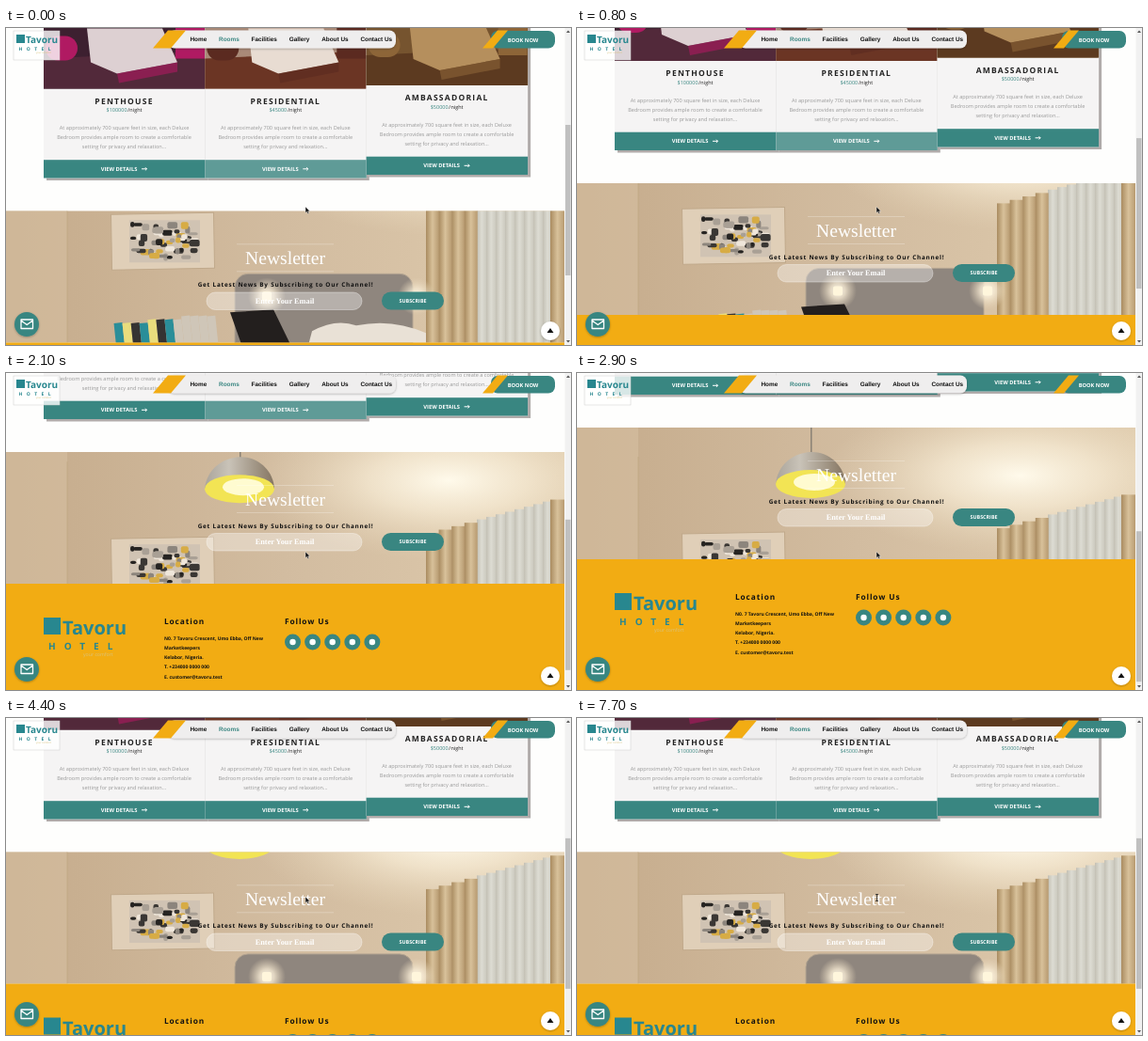
Animation, 600 px wide and 337 px high, one loop 8 s. Source, as an HTML page:

```html
<!DOCTYPE html>
<html lang="en">
<head>
<meta charset="utf-8">
<title>Hotel page scroll</title>
<style>
  html, body { margin: 0; width: 100%; height: 100%; overflow: hidden; background: #fefefd; }
  svg { display: block; }
  text { font-family: "Open Sans", sans-serif; text-rendering: geometricPrecision; white-space: pre; }
  .b { font-weight: 700; }
  .mid { text-anchor: middle; }
  .serif { font-family: "Liberation Serif", serif; }
  .nav { font-family: "Liberation Sans", sans-serif; font-weight: 700; }
</style>
</head>
<body>
<svg id="stage" width="600" height="337" viewBox="0 0 600 337">
  <defs>
    <linearGradient id="wall"><stop stop-color="#c5ab8b"/><stop offset=".5" stop-color="#d2bca0"/><stop offset="1" stop-color="#dfcbad"/></linearGradient>
    <radialGradient id="glow"><stop stop-color="#fffaeb"/><stop offset=".4" stop-color="#f5e9d2" stop-opacity=".8"/><stop offset="1" stop-color="#e6d5b8" stop-opacity="0"/></radialGradient>
    <linearGradient id="shade"><stop stop-color="#aaa49a"/><stop offset=".35" stop-color="#c9c3b8"/><stop offset="1" stop-color="#857561"/></linearGradient>
    <linearGradient id="drape"><stop stop-color="#a98b60"/><stop offset=".5" stop-color="#d8c19a"/><stop offset="1" stop-color="#b79a70"/></linearGradient>
    <linearGradient id="sheer"><stop stop-color="#c3c0b4"/><stop offset=".5" stop-color="#dddcd3"/><stop offset="1" stop-color="#cbc9be"/></linearGradient>
    <filter id="soft" x="-30%" y="-30%" width="160%" height="160%"><feDropShadow dx="0" dy=".8" stdDeviation=".8" flood-opacity=".3"/></filter>
  </defs>
  <g id="page"></g>
  <g id="fixed"></g>
</svg>
<script>
const TEAL = '#398681', GOLD = '#f2ac13';
const $ = id => document.getElementById(id);
const text = (s, x, y, size, cls = '', fill = '#111', gap = 0) =>
  `<text x="${x}" y="${y}" dy=".36em" font-size="${size}" class="${cls}" fill="${fill}" letter-spacing="${gap}">${s}</text>`;
const rect = (x, y, w, h, fill, more = '') =>
  `<rect x="${x}" y="${y}" width="${w}" height="${h}" fill="${fill}" ${more}/>`;
const pill = (x, y, w, h, fill, more = '') => rect(x, y, w, h, fill, `rx="${h / 2}" ${more}`);
const disc = (x, y, r, fill, more = '') => `<circle cx="${x}" cy="${y}" r="${r}" fill="${fill}" ${more}/>`;
const path = (d, fill, more = '') => `<path d="${d}" fill="${fill}" ${more}/>`;
const repeat = (n, fn) => Array.from({ length: n }, (_, i) => fn(i)).join('');

let seed = 11;
const random = () => (seed = seed * 16807 % 2147483647) / 2147483647;

// Page parts are placed relative to the top of the newsletter section.
const rooms = [
  { name: 'PENTHOUSE', price: '$100000', wall: '#3d2030', floor: '#52293a', bed: '#ddd0d2', accent: '#b01a62' },
  { name: 'PRESIDENTIAL', price: '$45000', wall: '#a98a78', floor: '#6b3524', bed: '#e8dcd2', accent: '#5b2a20' },
  { name: 'AMBASSADORIAL', price: '$50000', wall: '#76542f', floor: '#5c3a20', bed: '#b58f5d', accent: '#8d6538' }
];

const photo = ({ wall, floor, bed, accent }) =>
  rect(0, -245, 171.5, 115, wall) + path('M0-130V-162L171-170V-130Z', floor) +
  pill(2, -186, 34, 26, accent) + rect(140, -200, 31, 38, accent) +
  path('M46-194H126L142-158L78-146L50-158Z', bed) + path('M78-146L142-158V-148L80-136Z', accent, 'opacity=".6"');

function card(room, i) {
  const x = 85.5, copy = [
    'At approximately 700 square feet in size, each Deluxe',
    'Bedroom provides ample room to create a comfortable',
    'setting for privacy and relaxation...'
  ];
  return `<g transform="translate(${40 + 171.3 * i} ${i == 2 ? -3.5 : 0})">` +
    rect(3, -200, 171.5, 167.5, '#b0abaa') + rect(0, -200, 171.5, 165, '#f5f4f4') + photo(room) +
    text(room.name, x, -116.7, 8.5, 'b mid', '#222', 1.25) +
    text(`<tspan fill="${TEAL}">${room.price}</tspan><tspan dx=".8">/night</tspan>`, x, -107.3, 5.5, 'mid', '#222') +
    copy.map((line, n) => text(line, x, -88.5 + 10.2 * n, 5.55, 'mid', '#999')).join('') +
    rect(0, -54.3, 171.5, 19.3, TEAL, i == 1 ? 'id="hovered"' : '') +
    text('VIEW DETAILS', x - 5.5, -44.7, 5.75, 'b mid', '#fff') +
    path('M104-44.7h5.5m-1.6-1.6l1.6 1.6-1.6 1.6', 'none', 'stroke="#fff"') + '</g>';
}

function picture() {
  const inks = ['#262422', '#8c857d', '#efe6da', '#a9a095', '#3a3734', '#d7ac45'];
  return rect(112, 181, 109, 59, '#e0cfb8', 'stroke="#c0a98b" transform="rotate(-1 166 210)"') +
    rect(131, 188, 75, 45, '#d0c3b3') +
    repeat(60, i => rect(132 + random() * 64, 189 + random() * 37, 4 + random() * 7, 3 + random() * 5, inks[i % 6], 'rx="2"'));
}

const lamp = () => rect(248, 40, 1.5, 58, '#8a8175') +
  path('M211 129C213 108 230 96 248 95S284 108 285 129Z', 'url(#shade)') +
  '<ellipse cx="248" cy="129" rx="37" ry="15" fill="#f2e454"/><ellipse cx="252" cy="127" rx="22" ry="9" fill="#fffbd0"/>';

// Hanging folds whose tops follow the rising curtain rail.
const folds = (x, n, width, fill) =>
  repeat(n, i => rect(x + i * width, 176 - .27 * (x + i * width - 446), width + .3, 260, `url(#${fill})`));

function room() {
  const sconce = x => disc(x, 269, 20, 'url(#glow)') + rect(x - 5, 264, 10, 10, '#fff6dc', 'rx="2"');
  return rect(0, 0, 593, 400, 'url(#wall)') + rect(0, 0, 65, 400, '#d9c4a5', 'opacity=".5"') +
    rect(64.5, 100, 1, 300, '#b99f7a', 'opacity=".5"') +
    '<ellipse cx="470" cy="120" rx="210" ry="85" fill="url(#glow)"/>' +
    folds(500, 8, 10, 'sheer') + folds(446, 4, 13.6, 'drape') + folds(578, 1, 15, 'drape') +
    picture() + lamp() +
    rect(243, 245, 189, 150, '#8f867e', 'rx="14" stroke="#b3a491"') + sconce(277) + sconce(436) +
    path('M325 306Q350 292 372 300Q410 292 446 308V400H300Z', '#e9e1d6') +
    path('M238 286L284 283L302 320H250Z', '#231f1e') +
    repeat(12, i => rect(116 + i * 9, 294 + i % 4, 9, 40, ['#2a8e99', '#e9dd7d', '#353332', '#cfc6b8'][i < 7 ? i % 3 : 3], 'transform="rotate(-6 150 310)"'));
}

const newsletter = () =>
  `<svg width="593" height="140" overflow="hidden"><g id="room">${room()}</g></svg>` +
  [35, 64].map(y => rect(245, y, 103, .7, '#fff', 'opacity=".35"')).join('') +
  text('Newsletter', 296.5, 49.6, 19.6, 'serif mid', '#fff') +
  text('Get Latest News By Subscribing to Our Channel!', 297, 78.5, 6.4, 'b mid', '#111', .75) +
  pill(213, 86.5, 165, 18.5, '#fff', 'fill-opacity=".35" stroke="#fff" stroke-opacity=".5" stroke-width=".7"') +
  text('Enter Your Email', 296, 95.5, 8.3, 'serif b mid', '#fff') +
  pill(399, 86, 66, 19, TEAL) + text('SUBSCRIBE', 432, 95.5, 5.4, 'b mid', '#fff');

// The hotel sign is about 88 wide at scale 1.
const sign = (x, y, scale) => `<g transform="translate(${x} ${y}) scale(${scale})">` +
  rect(0, 2, 18, 18, '#28878f') + text('Tavoru', 20, 13, 20, 'b', '#28878f') +
  text('HOTEL', 5, 32, 10, 'b', '#28878f', 9) + text('your comfort', 42, 41, 5.2, '', '#d9c27a') + '</g>';

function footer() {
  const address = ['N0. 7 Tavoru Crescent, Umo Ebba, Off New', 'Marketkeepers', 'Kelabor, Nigeria.', 'T. +234000 0000 000', 'E. customer@tavoru.test'];
  return rect(0, 140, 593, 260, GOLD) + sign(40, 174, 1) +
    text('Location', 168, 180, 8.3, 'b', '#111', .9) + text('Follow Us', 296, 180, 8.3, 'b', '#111', .9) +
    address.map((line, i) => text(line, 168, 198 + i * 10.2, 5, 'b')).join('') +
    repeat(5, i => disc(304.5 + 21.1 * i, 202, 8.5, TEAL) + disc(304.5 + 21.1 * i, 202, 3.2, '#fff'));
}

function overlay() {
  const links = ['Home', 'Rooms', 'Facilities', 'Gallery', 'About Us', 'Contact Us']
    .map((s, i) => `<tspan dx="${i ? 12.8 : 0}" fill="${i == 1 ? TEAL : '#111'}">${s}</tspan>`).join('');
  const slash = (x, w) => path(`M${x} 21.5l16-19h${w}l-16 19z`, GOLD);
  return rect(8, 3, 49, 31, '#fff', 'fill-opacity=".8" stroke="#ccc" stroke-width=".5"') + sign(11, 6, .5) +
    rect(172, 2.5, 242, 19, '#efeeee', 'rx="7" filter="url(#soft)"') + slash(156, 19) +
    text(links, 195.5, 12, 6.4, 'nav') +
    rect(515, 3, 68, 18.5, TEAL, 'rx="7"') + slash(506, 11) + text('BOOK NOW', 549, 12.5, 5.7, 'b mid', '#fff') +
    disc(22, 315, 13, TEAL, 'filter="url(#soft)"') +
    path('M16 310h12.5v9.5H16zM16 311l6.2 4.5 6.2-4.5', 'none', 'stroke="#fff" stroke-width="1.3" stroke-linejoin="round"') +
    disc(578, 322, 10, '#fff', 'filter="url(#soft)"') + path('M574.5 324l3.5-5 3.5 5z', '#111') +
    rect(593.5, 0, 6.5, 337, '#f1f1f1') + rect(594, 0, 5.5, 160, '#c0c0c0', 'id="thumb"') +
    path('M595 5l2-2.5 2 2.5zM595 332l2 2.5 2-2.5z', '#555') +
    path('M318 190v6.5l1.5-1.3 1 2.3 1.2-.5-1-2.2h2z', '#111', 'id="arrow" stroke="#fff" stroke-width=".4"') +
    path('M317 187.5h3m-1.5 0v7m-1.5 0h3', 'none', 'id="beam" stroke="#222" stroke-width=".8"');
}

$('page').innerHTML = rooms.map(card).join('') + newsletter() + footer();
$('fixed').innerHTML = overlay();

// Key points of the scroll: time in ms, top of the newsletter section.
const scroll = [[0, 194.5], [800, 165], [2100, 84], [2900, 58], [3900, 113], [4400, 142.5], [8000, 142.5]];

function sectionTop(t) {
  const i = scroll.findIndex(([time]) => time > t);
  const [[t0, y0], [t1, y1]] = [scroll[i - 1], scroll[i]];
  return y0 + (y1 - y0) * (t - t0) / (t1 - t0);
}

function draw() {
  const t = Math.floor(performance.now() % 8000 / 100) * 100;
  const top = sectionTop(t);
  $('page').setAttribute('transform', `translate(0 ${top})`);
  // The photo behind the newsletter scrolls at a fifth of the page speed.
  $('room').setAttribute('transform', `translate(0 ${.2 * (top - 113) - top})`);
  $('thumb').setAttribute('y', 103 + (194.5 - top) * .478);
  $('hovered').setAttribute('fill', t < 2300 ? '#5f9b97' : TEAL);
  $(t < 7200 ? 'arrow' : 'beam').style.display = '';
  $(t < 7200 ? 'beam' : 'arrow').style.display = 'none';
  requestAnimationFrame(draw);
}
draw();
</script>
</body>
</html>
```
